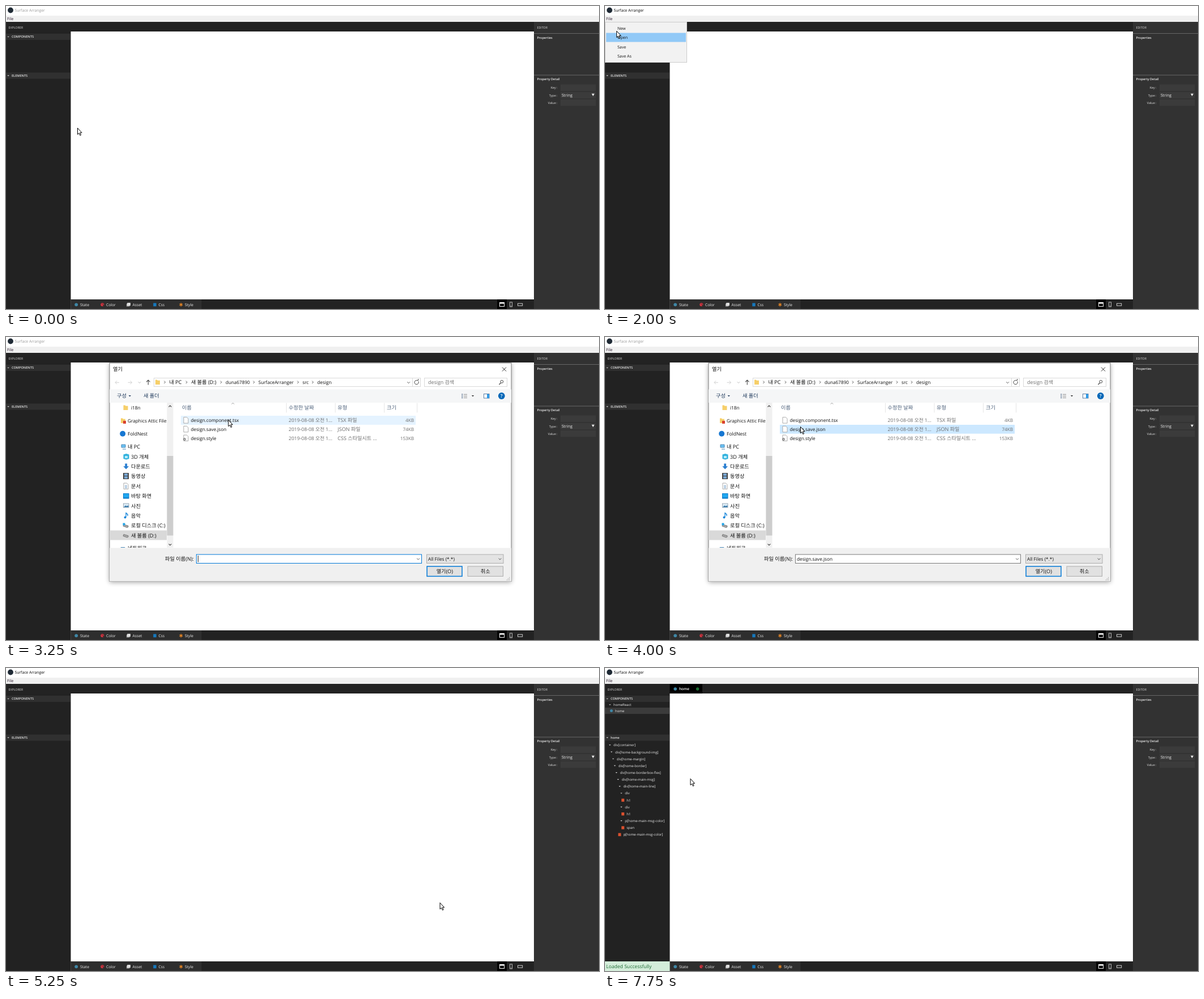
Animation of 1048x535 px, one loop 8 s. Source, as an HTML page:

```html
<!DOCTYPE html>
<html lang="ko">
<head>
<meta charset="utf-8">
<title>Surface Arranger</title>
<style>
html, body { margin: 0; width: 100%; height: 100%; overflow: hidden; background: #222; }
svg { display: block; }
text { font-family: "Open Sans", "Noto Sans CJK KR", "Noto Sans", sans-serif; white-space: pre; text-rendering: geometricPrecision; }
</style>
</head>
<body>
<svg id="stage" width="1048" height="535" viewBox="0 0 1048 535">
  <defs>
    <filter id="blur" x="-5%" y="-5%" width="110%" height="110%"><feGaussianBlur stdDeviation="4"/></filter>
    <clipPath id="side"><rect x="183" y="116" width="101" height="256"/></clipPath>
  </defs>
</svg>
<script>
const stage = document.getElementById('stage');
let layer = stage;

function add(tag, attrs, content) {
  const el = document.createElementNS('http://www.w3.org/2000/svg', tag);
  for (const k in attrs) el.setAttribute(k, attrs[k]);
  if (content) el.textContent = content;
  layer.appendChild(el);
  return el;
}
const rect = (x, y, width, height, fill, more) => add('rect', { x, y, width, height, fill, ...more });
const frame = (x, y, w, h, fill, stroke, width = 1) =>
  rect(x + .5, y + .5, w - 1, h - 1, fill, { stroke, 'stroke-width': width });
const dot = (cx, cy, r, fill) => add('circle', { cx, cy, r, fill });
const line = (d, stroke, width = 1, fill = 'none') => add('path', { d, stroke, fill, 'stroke-width': width });
const shape = (d, fill) => add('path', { d, fill });
// y is the middle of the capital letters
const text = (x, y, str, size, fill, more) =>
  add('text', { x, y: y + size * .36, 'font-size': size, fill, ...more }, str);
const bold = { 'font-weight': 600 }, end = { 'text-anchor': 'end' }, mid = { 'text-anchor': 'middle' };
const caret = (x, y, r, fill) => shape(`M${x - r} ${y - r / 2}h${2 * r}l${-r} ${r}z`, fill);
const chevron = (x, y, dx, dy, color, w = .9) =>
  line(dx ? `M${x - dx} ${y - 2.2}L${x + dx} ${y}L${x - dx} ${y + 2.2}`
          : `M${x - 2.4} ${y - dy}L${x} ${y + dy}L${x + 2.4} ${y - dy}`, color, w);

function group(draw, attrs) {
  const parent = layer;
  const g = layer = add('g', attrs);
  draw();
  layer = parent;
  return g;
}

// ---- window ----
rect(0, 0, 1048, 535, '#fff');
rect(0, 17, 1048, 11, '#f0f0f0');
dot(8, 7.5, 4.9, '#1f2a35');
const title = text(15.5, 7.8, 'Surface Arranger', 6.75, '#000');
text(2, 22.2, 'File', 7, '#2b1a2e');
rect(0, 28, 933, 17, '#232323');
rect(0, 45, 114.5, 490, '#222');
rect(114.5, 518, 819, 17, '#222');
rect(933, 28, 115, 507, '#323232');

// explorer
text(4.5, 38.5, 'EXPLORER', 5.3, '#ddd');
function section(y) {
  rect(0, y - 5.5, 114, 11, '#303030');
  caret(4, y + .2, 1.7, '#ddd');
}
section(54.3);
section(123);
text(10, 54.3, 'COMPONENTS', 5.6, '#e4e4e4', bold);
const heading = text(10, 123, 'ELEMENTS', 5.6, '#e4e4e4', bold);

// editor
text(938.5, 38.5, 'EDITOR', 5.3, '#ddd');
rect(933, 48, 115, 1, '#666');
text(938.5, 56.5, 'Properties', 5.45, '#eee', bold);
rect(933, 121.5, 115, 1, '#666');
text(938.5, 129.2, 'Property Detail', 5.5, '#eee', bold);
['Key :', 'Type :', 'Value :'].forEach((label, i) => {
  const y = 144.5 + i * 13.2;
  text(974.5, y, label, 5.4, '#e4e4e4', end);
  rect(980, y - 6, 62.5, 11.5, '#3b3b3b');
});
text(982, 157.2, 'String', 7, '#eee');
shape('M1035 154.7h5l-2.5 4.6z', '#eee');

// bottom bar
rect(114.5, 518, 231, 17, '#2e2e2e');
[[131, 'State'], [177, 'Color'], [223.5, 'Asset'], [269.5, 'Css'], [316, 'Style']]
  .forEach(([x, s]) => text(x, 527.3, s, 6.75, '#eee'));
dot(124.2, 527.3, 2.9, '#3f87a6');
dot(170.3, 527.3, 3, '#d6333f');
dot(169.4, 526, .6, '#2e2e2e');
dot(171.4, 526.2, .6, '#2e2e2e');
dot(172, 528.6, 1, '#2e2e2e');
rect(213, 525.5, 5.5, 5, '#aaa');
frame(214.3, 524, 5.7, 5.2, '#ddd', '#eee', .8);
rect(260.3, 524.5, 5.4, 5.8, '#1678bd');
for (let a = 0; a < 3; a++)
  rect(306.1, 526.8, 6.4, 1.2, '#f08a24', { transform: `rotate(${30 + a * 60} 309.3 527.4)` });
rect(868, 518, 17, 17, '#000');
frame(872, 523, 9, 8, '#000', '#fff');
rect(872, 523, 9, 2.6, '#fff');
frame(890, 522.5, 5, 9, 'none', '#bbb');
rect(891.7, 529.3, 1.6, .9, '#bbb');
frame(904, 524.7, 9.2, 5, 'none', '#ccc');

// ---- File menu ----
const menu = group(() => {
  frame(0, 28, 145, 72, '#f2f2f2', '#ccc');
  ['New', 'Open', 'Save', 'Save As'].forEach((s, i) => {
    const y = 39 + i * 16.5;
    if (i === 1) rect(2, y - 8, 141, 16, '#91c9f7');
    text(22, y, s, 7, '#111');
  });
});

// ---- open dialog ----
const INK = '#111', SOFT = '#6d6d6d', HEAD = '#4c607a';
const folder = (x, y) => shape(`M${x} ${y}h3l1 1.2h4v7.3h-8z`, '#f6cf6a');
const page = (x, y) => line(`M${x} ${y}h5.5l2.5 2.5v8h-8z`, '#999', .8, '#fff');
const drive = (x, y) => line(`M${x} ${y}l8 2.3v2.2l-2 1l-7-2.6z`, '#666', .8, '#aaa');
let hover, picked, nameBox, nameText, openButton;

const dialog = group(() => {
  rect(183, 47, 710, 386, '#000', { opacity: .38, filter: 'url(#blur)' });
  frame(182.5, 45.5, 711, 386.5, '#fff', '#7f7f7f');
  text(189, 57, '열기', 9.2, INK);
  line('M877 53.5l7 7M884 53.5l-7 7', '#111', .9);

  // address row
  line('M200 80.3h-7m3-3l-3 3l3 3M215.5 80.3h7m-3-3l3 3l-3 3', '#ccc', .9);
  chevron(236, 80.3, 0, 1, '#bbb');
  line('M251.3 84.5v-8.4m-3.2 3.3l3.2-3.3l3.2 3.3', '#444', 1.1);
  frame(261, 72, 472, 16, '#fff', '#d9d9d9');
  rect(718, 72, 1, 16, '#d9d9d9');
  folder(264, 75.5);
  [[288.5, '내 PC', 9.2], [327, '새 볼륨 (D:)', 9.2], [388, 'duna67890', 8.2], [446, 'SurfaceArranger', 8.2],
   [524, 'src', 8.2], [550, 'design', 8.3]].forEach(([x, s, size]) => {
    chevron(x - 8, 79.8, 1.1, 0, '#444');
    text(x, 79.8, s, size, INK);
  });
  chevron(711.5, 80.5, 0, 1.2, '#444');
  line('M728.6 78.2a3.6 3.6 0 1 1-3-1.7h3v-2.4', '#444', 1);
  frame(739, 72, 147, 16, '#fff', '#d9d9d9');
  text(746, 79.8, 'design 검색', 8.9, SOFT);
  line('M871.5 84l3-3', '#444', 1.2);
  add('circle', { cx: 876.3, cy: 78.8, r: 2.4, fill: 'none', stroke: '#444' });

  // toolbar
  rect(183, 92.5, 710, 23.5, '#f5f6f7');
  text(196, 104, '구성', 9.2, '#1e395b');
  caret(218.8, 104.2, 2.2, '#1e395b');
  text(243, 104, '새 폴더', 9.2, '#1e395b');
  for (let i = 0; i < 3; i++) {
    rect(805, 100.3 + i * 3, 2.5, 2, '#8a9bb0');
    rect(809, 100.8 + i * 3, 6, 1, '#8a8a8a');
  }
  caret(825, 104.2, 2.2, '#333');
  frame(844, 100, 10.5, 8.5, '#fff', '#5b7fa5');
  rect(850, 101, 4, 7, '#2f9be8');
  dot(875.8, 104, 5.9, '#0067b8');
  text(875.8, 104, '?', 8.5, '#fff', { ...mid, ...bold });

  // places
  group(() => {
    rect(183, 341.5, 101, 17, '#d9d9d9');
    folder(207.5, 120.5);
    folder(203, 143.5);
    rect(207, 148, 5, 5, '#d9402f');
    dot(206.2, 170.8, 5, '#1677d2');
    line('M204 190h7v5h-7zM206 198h6', '#4a87b5', 1, '#6bc3f5');
    shape('M207.5 207.5l5-1.5l5 1.5v7.5l-5 1.5l-5-1.5z', '#31b2de');
    rect(210, 210, 5, 4, '#b9ecfa');
    shape('M210.3 223.5h3.8v4.7h3l-4.9 5.3l-4.9-5.3h3z', '#2b7fd0');
    rect(207, 240, 10, 11, '#444');
    rect(209, 241, 6, 4, '#79a7d4');
    rect(209, 246, 6, 4, '#79a7d4');
    page(208, 258);
    line('M210 262.5h4M210 264.5h4M210 266.5h4', '#5c91c2', .8);
    rect(207, 276, 10.5, 9.5, '#0a78c9');
    rect(208, 277, 8.5, 6.5, '#20a8f0');
    frame(207, 293.5, 10.5, 8, '#dcecf7', '#8a9aa8', .8);
    shape('M208 300.5l3-3l2 1l3.5-1v3z', '#3577a8');
    line('M212 318.5v-8.5q1 2.5 3 3v3', '#1685d9', 1.3);
    dot(210.5, 318.5, 1.9, '#1685d9');
    drive(208, 331);
    rect(206.5, 328.5, 4, 4, '#23a4e8');
    drive(208, 348.5);
    line('M203 371.5h7v4h-7z', '#4a87b5', 1, '#6bc3f5');
    [[221, 125, 'i18n', 8.3], [215, 148, 'Graphics Attic Files', 8.25], [215, 171, 'FoldNest', 8.5], [215, 194, '내 PC', 9.2]]
      .forEach(([x, y, s, size]) => text(x, y, s, size, INK));
    ['3D 개체', '다운로드', '동영상', '문서', '바탕 화면', '사진', '음악', '로컬 디스크 (C:)', '새 볼륨 (D:)']
      .forEach((s, i) => text(221, 211.3 + i * 17.4, s, 9.2, INK));
    text(215, 373, '네트워크', 9.2, INK);
  }, { 'clip-path': 'url(#side)' });
  rect(284.5, 116, 11, 256, '#f0f0f0');
  rect(284.5, 210, 11, 140.5, '#cdcdcd');
  chevron(290, 122.3, 0, -1.2, '#444', 1.1);
  chevron(290, 366.5, 0, 1.2, '#444', 1.1);

  // file list
  [[311, '이름'], [499.5, '수정한 날짜'], [586, '유형'], [673, '크기']].forEach(([x, s]) => text(x, 125, s, 9.2, HEAD));
  [495, 581.5, 668, 726].forEach(x => rect(x, 116.5, 1, 17, '#e5e5e5'));
  chevron(401, 117.5, 0, -1, '#888', .8);
  hover = rect(309, 139, 415, 16, '#e5f3ff');
  picked = rect(309, 155, 415, 15.7, '#d9d9d9');
  [['design.component.tsx', 'TSX 파일', '4KB'], ['design.save.json', 'JSON 파일', '74KB'],
   ['design.style', 'CSS 스타일시트 ...', '153KB']].forEach(([name, type, size], i) => {
    const y = 147.2 + i * 15.7;
    page(314, y - 5.5);
    if (i === 2) {
      dot(315.5, y + 2, 2.3, '#777');
      dot(315.5, y + 2, .9, '#fff');
    }
    text(326.5, y, name, 8.25, INK);
    text(499.5, y, '2019-08-08 오전 1...', 8.65, SOFT);
    text(586, y, type, 9.1, SOFT);
    text(721, y, size, 8.15, SOFT, end);
  });

  // footer
  rect(183, 372.5, 710, 59, '#f0f0f0');
  text(332, 392, '파일 이름(N):', 9.2, INK, end);
  nameBox = frame(336, 383.5, 399, 16.5, '#fff', '#0078d7');
  nameText = text(339, 392, 'design.save.json', 8.25, INK);
  chevron(728.5, 392, 0, 1.2, '#444');
  frame(743, 383.5, 136.5, 16.5, '#e3e3e3', '#adadad');
  text(746, 392, 'All Files (*.*)', 8.25, INK);
  chevron(873, 392, 0, 1.2, '#444');
  openButton = frame(743.5, 404.5, 63, 18.5, '#e1e1e1', '#0078d7', 1.5);
  text(775.3, 413.8, '열기(O)', 9.1, INK, mid);
  frame(815.5, 404.5, 63.5, 18.5, '#e1e1e1', '#adadad');
  text(847.3, 413.8, '취소', 9.2, INK, mid);
  for (let i = 0; i < 3; i++)
    for (let j = 0; j <= i; j++) rect(889 - j * 2.2, 424 + i * 2.2, 1.2, 1.2, '#aaa');
});
const textCaret = rect(339, 386, .9, 11.5, '#111');

// ---- loaded project ----
let homeRow;
const project = group(() => {
  homeRow = rect(0, 70, 114, 11, '#3b3b3b');
  caret(8.7, 65, 1.7, '#ddd');
  text(15, 65, 'homeReact', 5.95, '#eee');
  dot(11.3, 75.5, 2.5, '#3f87a6');
  text(18, 75.5, 'home', 5.95, '#eee');
  rect(0, 518, 114.5, 17, '#d4edda');
  text(2, 527.3, 'Loaded Successfully', 8.65, '#1c6b33');
});

const tree = group(() => {
  rect(114.5, 28, 57.5, 17, '#000');
  dot(124.2, 37, 2.8, '#3f87a6');
  text(131, 37, 'home', 6.45, '#fff', bold);
  dot(163.6, 37, 2.7, '#1b6e31');
  // depth, label, leaf
  [[0, 'div[container]'], [1, 'div[home-background-img]'], [2, 'div[home-margin]'], [3, 'div[home-border]'],
   [4, 'div[home-borderbox-flex]'], [5, 'div[home-main-msg]'], [6, 'div[home-main-line]'], [7, 'div'], [8, 'h1', 1],
   [7, 'div'], [8, 'h1', 1], [7, 'p[home-main-msg-color]'], [8, 'span', 1], [6, 'p[home-main-msg-color]', 1]
  ].forEach(([depth, label, leaf], i) => {
    const x = 15 + depth * 2.9, y = 136.2 + i * 12.15;
    if (leaf) rect(x - 9.1, y - 2.7, 5, 5.4, '#d9502e');
    else caret(x - 6.4, y, 1.7, '#ddd');
    text(x, y, label, 6.05, '#e8e8e8');
  });
});

const cursor = line('M.5 .5V11.8L3 9.5L4.9 13.6L6.6 12.8L4.8 8.8H8.1Z', '#000', 1, '#fff');

// ---- timeline, in quarter seconds ----
const STEP = 250, STEPS = 32;
const path = [[0, 126, 215], [1, 132, 211], [4, 14, 28], [5, 9, 20], [6, 9, 20], [9, 24, 52], [10, 24, 52],
  [11, 246.5, 43], [13, 392.5, 146], [15, 352, 158], [16, 345, 158], [20, 766.5, 414], [21, 766.5, 414],
  [24, 336, 180], [25, 309, 207], [28, 28, 73], [30, 28, 73], [31, 150.5, 195], [32, 150.5, 195]];

function cursorAt(n) {
  const i = path.findIndex(p => p[0] > n);
  const [n0, x0, y0] = path[i - 1], [n1, x1, y1] = path[i];
  const k = (n - n0) / (n1 - n0), e = k * k * (3 - 2 * k);
  return [x0 + (x1 - x0) * e, y0 + (y1 - y0) * e];
}
const show = (el, on) => el.setAttribute('display', on ? 'inline' : 'none');

function draw() {
  const n = Math.floor(performance.now() / STEP) % STEPS;
  const within = (a, b = STEPS) => n >= a && n < b;
  const chosen = n >= 16;
  title.setAttribute('fill', within(5, 10) || within(21) ? '#000' : '#999');
  show(menu, within(6, 10));
  show(dialog, within(12, 21));
  show(hover, n < 16);
  hover.setAttribute('y', n < 14 ? 139 : 155);
  show(picked, chosen);
  picked.setAttribute('fill', n < 20 ? '#cce8ff' : '#d9d9d9');
  show(nameText, chosen);
  show(textCaret, within(12, 16));
  nameBox.setAttribute('stroke', chosen ? '#7a7a7a' : '#0078d7');
  openButton.setAttribute('fill', n < 20 ? '#e1e1e1' : '#cce4f7');
  show(project, within(22));
  show(homeRow, within(28));
  show(tree, within(30));
  heading.textContent = n < 30 ? 'ELEMENTS' : 'home';
  cursor.setAttribute('transform', `translate(${cursorAt(n)})`);
  requestAnimationFrame(draw);
}
draw();
</script>
</body>
</html>
```
